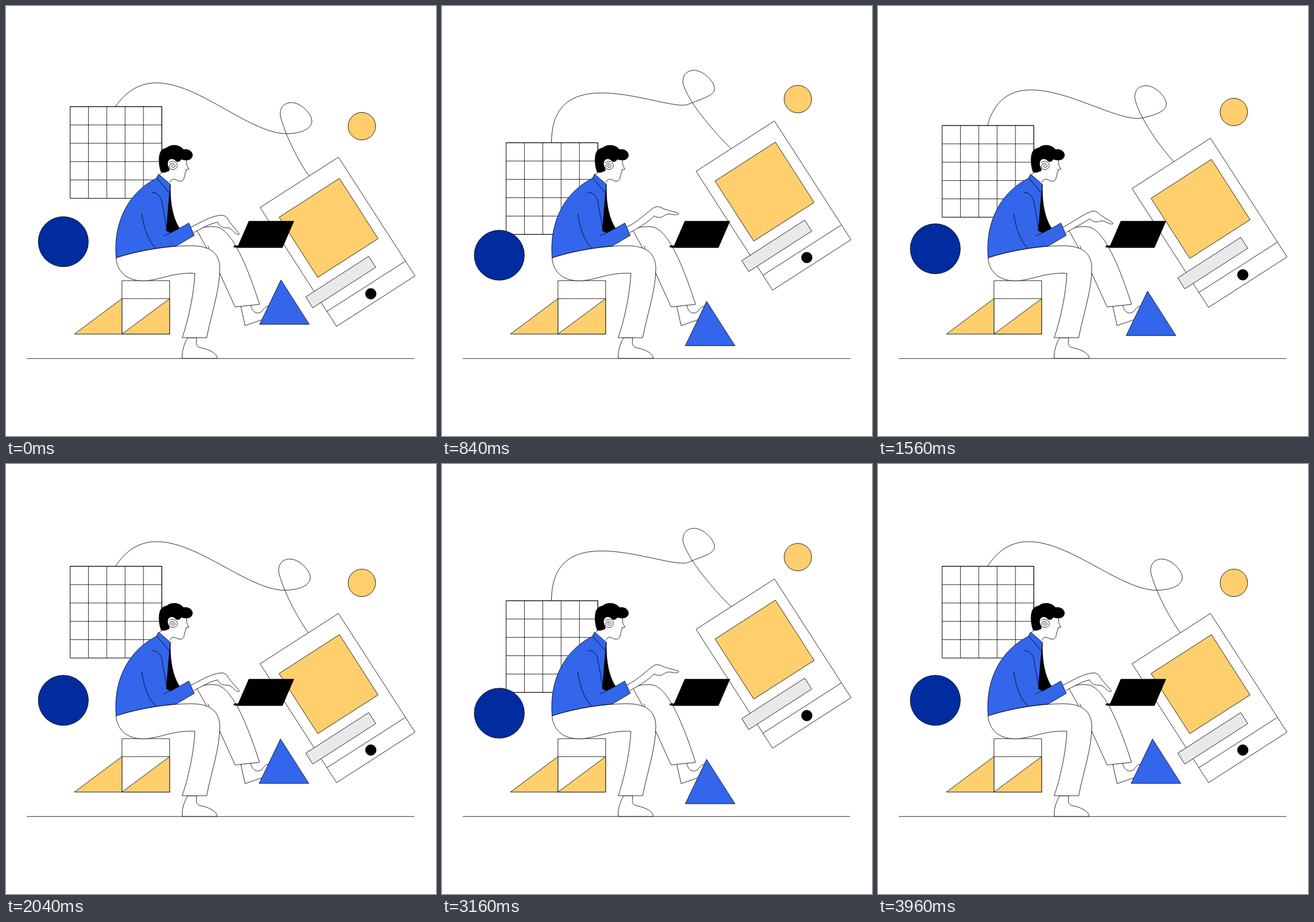
An HTML page for the animation above (4 s loop, 748 by 748 pixels).

```html
<!DOCTYPE html>
<html lang="en">
<head>
<meta charset="utf-8">
<title>Working on a laptop</title>
<style>
  html, body { margin: 0; width: 100%; height: 100%; overflow: hidden; background: #fff; }
  svg { display: block; width: 100%; height: 100%; stroke: #000; stroke-width: .85; }
  .white { fill: #fff; }
  .line { fill: none; }
  .black { fill: #000; }
  .blue { fill: #3366eb; }
  .navy { fill: #002ca0; }
  .gold { fill: #ffcf6e; }
  .grey { fill: #e9e9e9; }
</style>
</head>
<body>
<svg viewBox="0 0 748 748">
  <path class="line" d="M36 613.2H710"/>
  <path id="cord" class="line"/>

  <path id="grid" class="white"/>

  <g id="phone">
    <path class="white" d="M442 350.5L578.3 263L711.5 469.5L575 557.3Z"/>
    <path class="line" d="M558 531.5L694.5 444"/>
    <path class="gold" d="M475 367.5L580 299.8L647.3 404.7L542.3 472Z"/>
    <path class="grey" d="M521.5 506L631 435.5L643.2 454.5L533.5 525Z"/>
    <circle class="black" cx="634.6" cy="500.6" r="9.3"/>
  </g>

  <circle id="ball" class="navy" cx="99.7" cy="410" r="43.6"/>
  <circle id="sun" class="gold" cx="619" cy="209" r="23.9"/>

  <g id="bench">
    <path class="white" d="M201.7 477.8H284.7V570.7H201.7ZM201.7 509H284.7"/>
    <path class="gold" d="M119 570.7L201.7 509V570.7ZM201.7 570.7L284.7 509V570.7Z"/>
  </g>

  <g id="legs">
    <path class="white" d="M408 521L416 556L446 545.5C455 541 459 530 457 523C452 521 449 527 444 532C437 537 428 533 425.5 520Z"/>
    <path class="white" d="M332 390C340 385 350 383 364 384C392 386 419 450 441 519L398.5 523.5L366 452Z"/>
    <path class="white" d="M316 577C309 589 306 601 306.5 613H367.500C367 604 353 597 338 594.5C331 592 330 588 332 577Z"/>
    <path class="white" d="M191.5 438C193 461 209 478 238 478C267 478 288 463 328.5 465C327 503 316 550 306.5 577H349C358 533 372 493 372 456C371 429 355 417.5 322 417C285 417 235 424 191.5 438Z"/>
    <path class="line" d="M351 417L353.5 422"/>
  </g>
  <path id="triangle" class="blue" d="M478.3 476.5L527.6 553.8H441.2Z"/>

  <path class="black" d="M422.5 374.3H500.7L480.8 420.2H404L396.5 419.5V417H404Z"/>
  <path id="arm" class="white"/>

  <g id="torso">
    <path class="black" d="M284.5 322L286 311C285 345 291 370 302 387L286 395L278 392Z"/>
    <path class="blue" d="M263 299C216 322 186 372 191.5 438C225 427 258 421 296 417.5L327.5 399L318 377.5C307 384 297 389 286.5 394.5L279 391L284.5 325Z"/>
    <path class="line" d="M253 324.5C262 324 268 329 271 339C274 359 278 376 280 391M236 361C240 386 247 410 262 422M274 400C279 398 283 396 286.5 394.5"/>
  </g>

  <g id="head">
    <path class="white" stroke="none" d="M273 287L267 294L285.5 309.5L287 303C292 298 299 306 304 304.5C311 302 310 291 313 287L318.5 284L312 264H282Z"/>
    <path class="line" d="M273 287L267.5 293M285.5 307C287 299 294 301 298 303.5C303 306 309 305 310 298C311 293 312 289 313.5 287L312.5 285L318.5 283.5C315 280 313.5 274 314 267"/>
    <path class="black" d="M270 289C265 276 265 259 270 252C274 247 279 248 282 245C290 240 303 242 309 250C318 248 326 254 324 262C321 269 313 269 305 266.5C301 272 297 272 294 268C288 263 281 267 281 274C281 280 285 282 284 286C280 289 275 290 270 289Z"/>
    <path class="white" d="M284 273C287 268 296 270 298 276C299 281 294 285 289 284.5C284 283 283 277 287 274.5C291 272.5 295 276 294 279C292.5 282 288 281 288 278C288.5 276 291 276 291.5 278"/>
    <path class="blue" d="M265.5 292.3L286 310.3L284.5 325.5L262 299Z"/>
  </g>
</svg>

<script>
const STEP = 40, HALF = 1000;
const $ = id => document.getElementById(id);
const setPath = (id, d) => $(id).setAttribute("d", d);

// How far each floating piece drifts in half a cycle.
const drift = {
  grid: [0, 74.8], phone: [0, -75], sun: [0, -56], ball: [0, 28], triangle: [-21.4, 44.3]
};

function gridPath(x, y, size, n) {
  let d = "";
  for (let i = 0; i <= n; i++) {
    const s = size * i / n;
    d += `M${x + s} ${y}v${size}M${x} ${y + s}h${size}`;
  }
  return d + `M${x} ${y}h${size}v${size}h${-size}z`;
}

// The cord hangs between grid and phone; its loop drifts as one piece.
function cordPath(k) {
  const p = (x, y, dx, dy) => `${x + dx * k} ${y + dy * k} `;
  const loop = (x, y) => p(x, y, -69, -66.7);
  return "M" + p(190.5, 175, 0, 74.8)
    + "C" + p(270, 60, -95, 27) + p(401, 222, -8, -42) + p(488, 222, -70, -61)
    + "C" + p(515, 222, -78, -72) + loop(532, 213) + loop(532, 200)
    + "S" + loop(512, 168) + loop(497, 168)
    + "S" + loop(477, 178) + loop(477, 188)
    + "S" + p(498, 255, -73, -87) + p(527, 295.5, -28.6, -56);
}

// The hand lifts and swings about the wrist; the sleeve end stays put.
function armPath(k) {
  const hand = (x, y) => {
    const u = x - 370, v = y - 370;
    return `${x + k * (-3.6 - .21 * u + .68 * v)} ${y + k * (-13 - .68 * u - .21 * v)} `;
  };
  return "M321 385C340 376 " + hand(358, 364) + hand(376, 364)
    + "C" + hand(385, 365) + hand(386, 372) + hand(390, 377)
    + "S" + hand(399, 388) + hand(404, 394)
    + "S" + hand(402, 397) + hand(400, 396)
    + "S" + hand(392, 387) + hand(387, 386)
    + "S" + hand(374, 388) + hand(368, 376)
    + "C" + hand(354, 379) + "342 386 327 394";
}

function draw(ms) {
  const t = Math.floor((ms + 1) / STEP) * STEP % (2 * HALF);
  const k = 1 - Math.abs(1 - t / HALF);
  for (const id in drift) {
    const [x, y] = drift[id];
    $(id).setAttribute("transform", `translate(${x * k} ${y * k})`);
  }
  setPath("cord", cordPath(k));
  setPath("arm", armPath(k));
}

setPath("grid", gridPath(111.5, 175, 159.5, 5));

let start;
function tick(now) {
  start ??= now;
  draw(now - start);
  requestAnimationFrame(tick);
}
draw(0);
requestAnimationFrame(tick);
</script>
</body>
</html>
```
